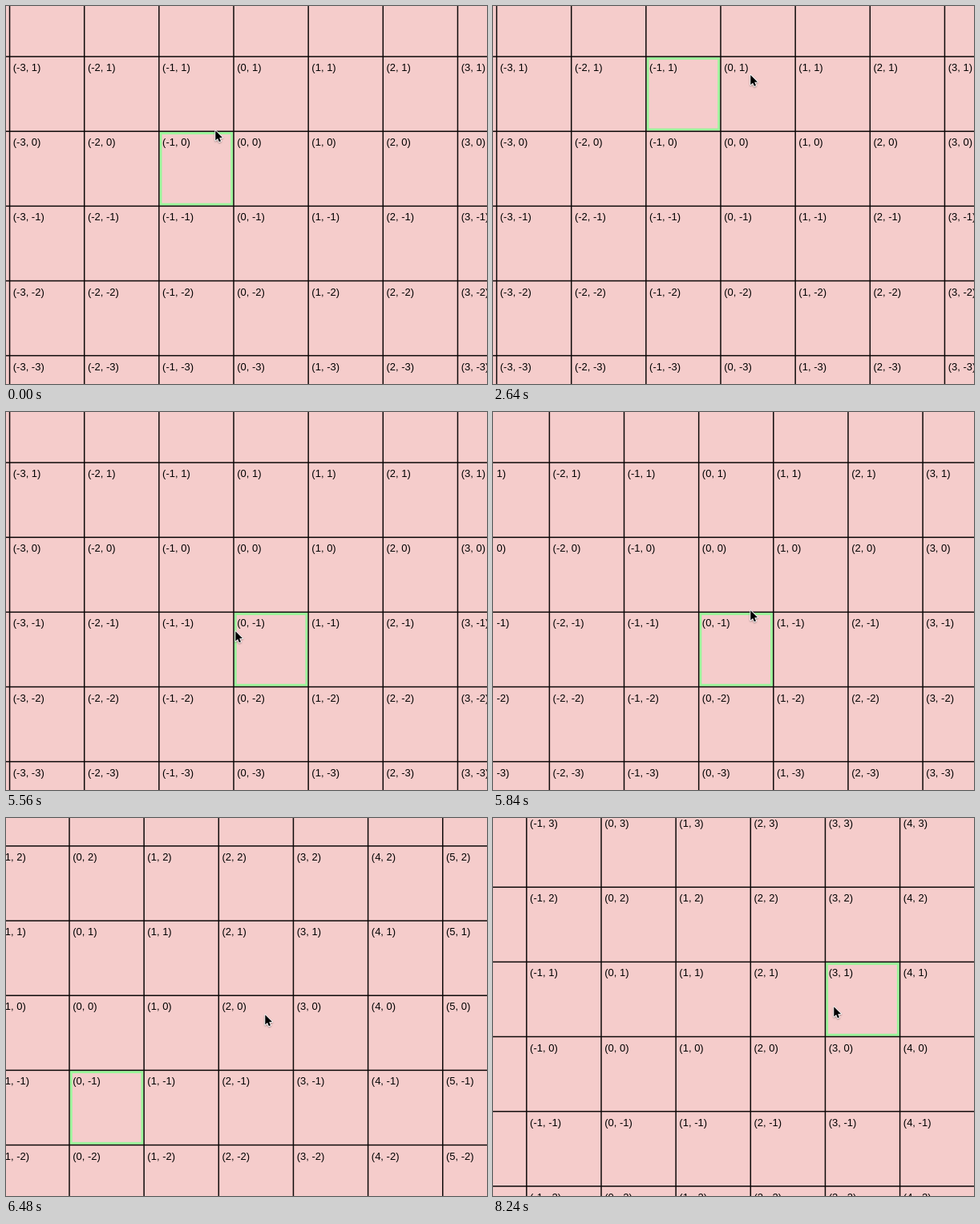
These frames come from a looping animation (600 by 471 pixels, 8720 ms). An HTML page with a canvas:

```html
<!DOCTYPE html>
<html lang="en">
<head>
<meta charset="utf-8">
<title>Infinite grid</title>
<style>
  html, body { margin: 0; width: 100%; height: 100%; overflow: hidden; background: #f5cccb; }
  canvas { display: block; width: 600px; height: 471px; }
</style>
</head>
<body>
<canvas id="stage" width="600" height="471"></canvas>
<script>
const W = 600, H = 471, LOOP = 8720, STEP = 40;
const CELL = 93.15, ORIGIN = { x: 284, y: 156.2 };
const HOTSPOT = { x: 1.5, y: 2.5 };
const ctx = document.getElementById('stage').getContext('2d');

// Key points around an ellipse: [time, x, y]
function orbit(t0, t1, a0, a1, count) {
  return Array.from({ length: count + 1 }, (_, i) => {
    const u = i / count, a = a0 + (a1 - a0) * u;
    return [t0 + (t1 - t0) * u, 300 + 240 * Math.cos(a), 250 + 165 * Math.sin(a)];
  });
}

const opening = [
  [0, 261, 155], [160, 120, 180], [300, 40, 270], [440, 90, 390], [580, 250, 408],
  [760, 368, 190], [800, 412, 83], [1000, 480, 80], [1220, 510, 300], [1400, 340, 240],
  [1440, 345, 150], [1480, 370, 126]
];
const crossing = [
  [3780, 480, 120], [3840, 525, 175], [3880, 480, 196], [3920, 428, 205], [4080, 230, 260]
];
const settling = [
  [5380, 240, 390], [5480, 330, 330], [5560, 286, 273], [5640, 305, 255], [5720, 321, 247],
  [6280, 321, 247], [6480, 323, 245], [7200, 323, 245]
];
const ending = [
  [7360, 380, 150], [7480, 470, 112], [7600, 503, 200], [7720, 470, 330], [7820, 385, 352],
  [7980, 370, 215], [8080, 443, 249], [8180, 417, 231], [8240, 425, 235]
];
const pointerKeys = [
  ...opening, ...orbit(1640, 3640, -0.9, 10.5, 14), ...crossing,
  ...orbit(4220, 5240, 3.1, -3.6, 9), ...settling, ...ending
];
const panKeys = [
  [5720, 0, 0], [6080, -144.5, 0], [6260, -205, 0], [6300, -205, 0],
  [6480, -205, 65], [6700, -190, 105], [7000, -149, 116.3]
];

const same = (a, b) => a[1] === b[1] && a[2] === b[2];

// Slope at a key point; zero wherever the motion rests
function slope(keys, i, axis) {
  const a = keys[i - 1], b = keys[i], c = keys[i + 1];
  if (!a || !c || same(a, b) || same(b, c)) return 0;
  return (c[axis] - a[axis]) / (c[0] - a[0]);
}

function along(keys, t) {
  let i = 0;
  while (i < keys.length - 2 && t >= keys[i + 1][0]) i++;
  const a = keys[i], b = keys[i + 1], span = b[0] - a[0];
  const u = Math.max(0, Math.min(1, (t - a[0]) / span));
  const hermite = axis =>
    (1 + 2 * u) * (1 - u) ** 2 * a[axis] + u * (1 - u) ** 2 * span * slope(keys, i, axis) +
    u * u * (3 - 2 * u) * b[axis] + u * u * (u - 1) * span * slope(keys, i + 1, axis);
  return { x: hermite(1), y: hermite(2) };
}

// The highlight trails the pointer by one step and ignores scrolling
function hoveredCell(t) {
  let at = Math.max(0, t - STEP);
  if (at > 5640 && at < 6920) at = 5640;
  const p = along(pointerKeys, at), pan = along(panKeys, at);
  return {
    col: Math.floor((p.x + HOTSPOT.x - ORIGIN.x - pan.x) / CELL),
    row: -Math.floor((p.y + HOTSPOT.y - ORIGIN.y - pan.y) / CELL)
  };
}

function drawGrid(pan, hover) {
  const left = ORIGIN.x + pan.x, top = ORIGIN.y + pan.y;
  const firstCol = Math.floor(-left / CELL), lastCol = Math.ceil((W - left) / CELL);
  const firstLine = Math.floor(-top / CELL), lastLine = Math.ceil((H - top) / CELL);

  ctx.strokeStyle = '#9bf59b';
  ctx.lineWidth = 3;
  ctx.strokeRect(left + hover.col * CELL + 2.2, top - hover.row * CELL + 2.2, CELL - 4.4, CELL - 4.4);

  ctx.fillStyle = '#0c0808';
  for (let c = firstCol; c <= lastCol; c++) ctx.fillRect(left + c * CELL - 0.75, 0, 1.5, H);
  for (let r = firstLine; r <= lastLine; r++) ctx.fillRect(0, top + r * CELL - 0.75, W, 1.5);

  ctx.fillStyle = '#000';
  ctx.font = '13px "Liberation Sans", Arial, sans-serif';
  for (let r = firstLine; r <= lastLine; r++) {
    for (let c = firstCol; c <= lastCol; c++) {
      ctx.fillText(`(${c}, ${0 - r})`, left + c * CELL + 4.2, top + r * CELL + 18);
    }
  }
}

function drawPointer(p) {
  ctx.save();
  ctx.translate(p.x, p.y);
  ctx.beginPath();
  [[0.3, 0.3], [0.3, 12.6], [3.1, 10], [4.9, 14.2], [7, 13.3], [5.2, 9.2], [9, 9]]
    .forEach(([x, y]) => ctx.lineTo(x, y));
  ctx.closePath();
  ctx.lineJoin = 'round';
  ctx.lineWidth = 1.8;
  ctx.strokeStyle = '#fff';
  ctx.shadowColor = 'rgba(0, 0, 0, 0.35)';
  ctx.shadowBlur = 2;
  ctx.shadowOffsetY = 1;
  ctx.stroke();
  ctx.shadowColor = 'transparent';
  ctx.fillStyle = '#000';
  ctx.fill();
  ctx.restore();
}

function draw(now) {
  let t = Math.floor((now % LOOP) / STEP) * STEP;
  if (t > 800 && t < 1000) t = 800;
  ctx.fillStyle = '#f5cccb';
  ctx.fillRect(0, 0, W, H);
  drawGrid(along(panKeys, t), hoveredCell(t));
  drawPointer(along(pointerKeys, t));
}

let start;
function tick(now) {
  start ??= now;
  draw(Math.max(0, now - start));
  requestAnimationFrame(tick);
}
draw(0);
requestAnimationFrame(tick);
</script>
</body>
</html>
```
